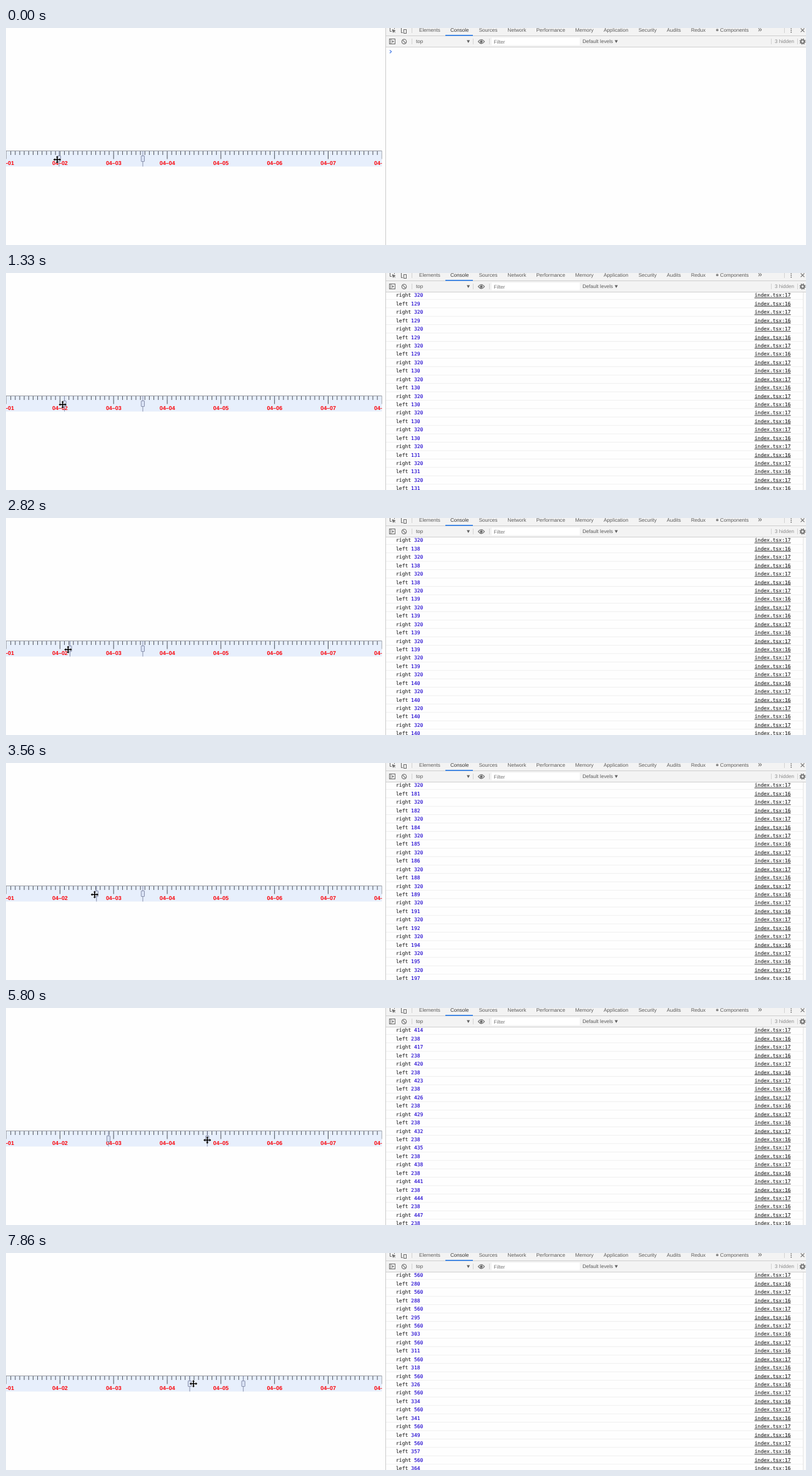
Recreate the animation shown at these times as an HTML page. Size 1280x347 px, loop 8 s.

```html
<!DOCTYPE html>
<html lang="en">
<head>
<meta charset="utf-8">
<title>Range slider with console</title>
<style>
  html, body { margin: 0; width: 100%; height: 100%; overflow: hidden; background: #fff; }
  svg { display: block; width: 100vw; height: 100vh; }
  text { text-rendering: geometricPrecision; white-space: pre; }
  .ui { font: 8.08px "Liberation Sans", Arial, sans-serif; fill: #5a5a5a; }
  .mono { font: 8px "DejaVu Sans Mono", Menlo, monospace; fill: #282828; stroke: #282828; stroke-width: .12; }
  .day { font: bold 8.9px "Liberation Sans", Arial, sans-serif; fill: #fb0007; text-anchor: middle; }
  .link { text-anchor: end; text-decoration: underline; }
  .num { fill: #1c00cf; stroke: #1c00cf; }
  .icon { fill: none; stroke: #6a6a6a; }
</style>
</head>
<body>
<svg viewBox="0 0 1280 347">
  <rect width="1280" height="347" fill="#fefefe"/>
  <g id="ruler">
    <rect y="196" width="601.5" height="25.5" fill="#e7effc"/>
    <path d="M0 196.5H601.5" stroke="#989ba2"/>
  </g>
  <g id="handles"></g>
  <g id="console"></g>
  <path id="prompt" d="M614 -2.2L616.7 .2L614 2.6" fill="none" stroke="#4a7fe8" stroke-width="1.2"/>
  <g id="bar">
    <rect x="1275" y="31" width="5" height="316" fill="#fbfbfb"/>
    <path d="M1275.5 31V347" stroke="#e4e4e4"/>
  </g>
  <g id="tools">
    <rect x="607" width="673" height="30.5" fill="#f3f3f3"/>
    <path d="M607 12.5H1280M607 30.5H1280" stroke="#cfcfcf"/>
    <path d="M649.5 0V8M649.5 17V26M747.5 17V26M773.5 17V26M1224.5 17V26M1266.5 17V26M1245.5 0V8" stroke="#d2d2d2"/>
    <path d="M703 11.8H747" stroke="#1a73e8" stroke-width="1.4"/>
    <g class="icon">
      <path d="M614.5 0V5.5H617M621.5 0V1.5"/>
      <path d="M618 2.5L623 4.3L621 5.2L622.8 7.5M618 2.5L619.5 7.3L621 5.2" fill="#6a6a6a" stroke-width=".8"/>
      <path d="M632.5 0V7.5H635M635 -1H640.5"/>
      <rect x="636.5" y="2.5" width="4" height="6"/>
      <rect x="613.5" y="17.5" width="9" height="8"/>
      <path d="M615.8 17.5V25.5"/>
      <path d="M618 19.5V23.7L620.8 21.6Z" fill="#6a6a6a" stroke="none"/>
      <circle cx="637" cy="21.7" r="3.7" stroke-width="1.1"/>
      <path d="M634.4 19.1L639.6 24.3" stroke-width="1.1"/>
      <path d="M755.5 21.7Q760.5 15.3 765.5 21.7Q760.5 28.1 755.5 21.7Z" stroke-width="1.1"/>
      <circle cx="760.5" cy="21.7" r="1.7" fill="#6a6a6a"/>
      <circle cx="1274.5" cy="21.7" r="2.7" stroke-width="1.7"/>
      <circle cx="1274.5" cy="21.7" r="4.2" stroke-width="1.4" stroke-dasharray="1.65"/>
      <path d="M1271.6 .6L1277.4 6.4M1277.4 .6L1271.6 6.4" stroke-width="1.1"/>
    </g>
    <path d="M737.2 19.4H742.2L739.7 24Z M973.9 19.4H978.9L976.4 24Z" fill="#5f5f5f"/>
    <g fill="#5f5f5f">
      <circle cx="1256.3" cy=".2" r=".9"/><circle cx="1256.3" cy="3.4" r=".9"/><circle cx="1256.3" cy="6.6" r=".9"/>
      <circle cx="1138" cy="3.3" r="2" fill="#888"/>
    </g>
    <rect x="777" y="15.5" width="141" height="12" fill="#fff"/>
  </g>
  <path d="M607.5 0V347" stroke="#cbcbcb"/>
  <g id="cursor" stroke="#fff" paint-order="stroke" stroke-linejoin="round">
    <path id="cross" stroke-width=".7" d="M0 -6L2 -3.6H.8V-.8H3.6V-2.2L6.2 0L3.6 2.2V.8H.8V3.6H2L0 6L-2 3.6H-.8V.8H-3.6V2.2L-6.2 0L-3.6 -2.2V-.8H-.8V-3.6H-2Z"/>
    <path id="arrow" stroke-width="1.2" d="M0 0V9.6L2.2 7.6L3.8 11.2L5.5 10.4L3.9 7H6.9Z"/>
  </g>
</svg>
<script>
const LOOP = 8000, START = 450, STEP = 148.2;
const EVENT = 17, LAG = 150; // time between logged moves, delay of the console
const ROWS = 24, PITCH = 13.43;
const $ = id => document.getElementById(id);

function add(parent, tag, attrs = {}, text = "") {
  const el = document.createElementNS("http://www.w3.org/2000/svg", tag);
  for (const k in attrs) el.setAttribute(k, attrs[k]);
  el.textContent = text;
  return parent.appendChild(el);
}
const show = (el, on) => el.setAttribute("display", on ? "inline" : "none");
const move = (el, x, y) => el.setAttribute("transform", `translate(${x} ${y})`);
const mix = (a, b, p) => a + (b - a) * p;

// Straight lines between [time, value] points.
function path(points, t) {
  const i = points.findIndex(p => p[0] > t);
  if (i === 0) return points[0][1];
  if (i < 0) return points[points.length - 1][1];
  const [t0, a] = points[i - 1], [t1, b] = points[i];
  return mix(a, b, (t - t0) / (t1 - t0));
}

// Slider values, in the units that the console logs.
const left = t => path([[300, 120], [1340, 133], [2370, 137], [2670, 140], [2820, 146],
  [3710, 222], [4110, 224], [4300, 235], [4400, 238], [7430, 238], [7860, 432]], t);
const right = t => path([[5000, 320], [5450, 414], [5785, 474], [6640, 539], [6820, 556], [6900, 560]], t);
const toX = v => 4.5 + 0.67 * v;

// The pointer holds a handle during each drag and glides to the next one.
const drags = [
  { from: 0, to: 4320, value: left, offset: -3, drift: 0, y: 210.4, arc: 0 },
  { from: 4850, to: 6800, value: right, offset: 0, drift: 0, y: 211.2, arc: 0 },
  { from: 7230, to: 7860, value: left, offset: 0, drift: 6, y: 209, arc: 7 }
];
const grip = (d, t) => toX(d.value(t)) + d.offset + d.drift * (t - d.from) / (d.to - d.from);

function pointer(t) {
  const next = drags.find(d => t <= d.to) || drags[2];
  if (t >= next.from) return { x: grip(next, t), y: next.y, held: true };
  const last = drags[drags.indexOf(next) - 1];
  const p = (t - last.to) / (next.from - last.to), eased = 1 - (1 - p) ** 5.5;
  return {
    x: mix(grip(last, last.to), grip(next, next.from), eased),
    y: mix(last.y, next.y, p) - next.arc * Math.sin(Math.PI * p),
    held: false
  };
}

// Ruler: one long mark per day, twelve steps a day.
const ruler = $("ruler");
for (let i = 0; i <= 84; i++) {
  const x = 0.5 + i * 600.8 / 84, end = i % 84 === 0;
  add(ruler, "path", { d: `M${x} 197V${i % 12 ? 203 : 209.5}`, stroke: end ? "#a0a3aa" : "#3c3f47", "stroke-width": 0.9 });
}
const days = add(ruler, "svg", { width: 601.5, height: 347 });
for (let d = 0; d < 8; d++)
  add(days, "text", { class: "day", x: 0.6 + d * 85.83, y: 218.9 }, `04–0${d + 1}`);

const handles = [left, right].map(value => {
  const g = add($("handles"), "g", { stroke: "#8890ac" });
  add(g, "path", { d: "M0 197V221.5" });
  add(g, "rect", { x: -2.6, y: 204.5, width: 5.2, height: 9, rx: 0.6, fill: "#d9e2f5" });
  return { g, value };
});

// Developer tools captions.
const label = (s, x, y, fill = "#5a5a5a") => add($("tools"), "text", { class: "ui", x, y, style: `fill:${fill}` }, s);
let tabX = 661;
for (const name of "Elements Console Sources Network Performance Memory Application Security Audits Redux".split(" "))
  tabX += label(name, tabX, 6.2, name === "Console" ? "#333" : "#5a5a5a").getComputedTextLength() + 16.2;
label("Components", 1142.6, 6.2);
label("»", 1203, 6.4).style.fontSize = "12px";
label("top", 656, 24.4);
label("Filter", 780.6, 24.6, "#777");
label("Default levels", 922.5, 24.4);
label("3 hidden", 1230, 24.4, "#8a8a8a");

const rows = Array.from({ length: ROWS }, () => {
  const g = add($("console"), "g");
  add(g, "path", { d: "M608 6.8H1275", stroke: "#efefef" });
  const text = add(g, "text", { class: "mono", x: 624, y: 2.9 });
  const name = add(text, "tspan"), num = add(text, "tspan", { class: "num" });
  const link = add(g, "text", { class: "mono link", x: 1255.6, y: 2.9 });
  return { g, name, num, link };
});

function drawConsole(t) {
  const count = t < START ? 0 : Math.min(ROWS, 2 * Math.floor((t - 380) / EVENT));
  const full = count === ROWS, top = full ? 35.5 : 37.6;
  rows.forEach((row, i) => {
    show(row.g, i < count);
    move(row.g, 0, top + i * PITCH);
    const isLeft = i % 2 === (full ? 1 : 0);
    const age = count / 2 - 1 - (i >> 1);
    row.name.textContent = isLeft ? "left " : "right ";
    row.num.textContent = Math.round((isLeft ? left : right)(t - LAG - age * EVENT));
    row.link.textContent = `index.tsx:${isLeft ? 16 : 17}`;
  });
  move($("prompt"), 0, top + count * PITCH);
  show($("prompt"), !full);
  show($("bar"), full);
}

function draw(time) {
  // The screen is refreshed in even steps after a short rest.
  const step = Math.floor((time - START + 10) / STEP);
  const t = step < 0 ? 0 : START + step * STEP;
  for (const { g, value } of handles) move(g, toX(value(t)), 0);
  const { x, y, held } = pointer(t);
  move($("cursor"), x, y);
  show($("cross"), held);
  show($("arrow"), !held);
  drawConsole(t);
}

const start = performance.now();
function loop() {
  draw((performance.now() - start) % LOOP);
  requestAnimationFrame(loop);
}
loop();
</script>
</body>
</html>
```
